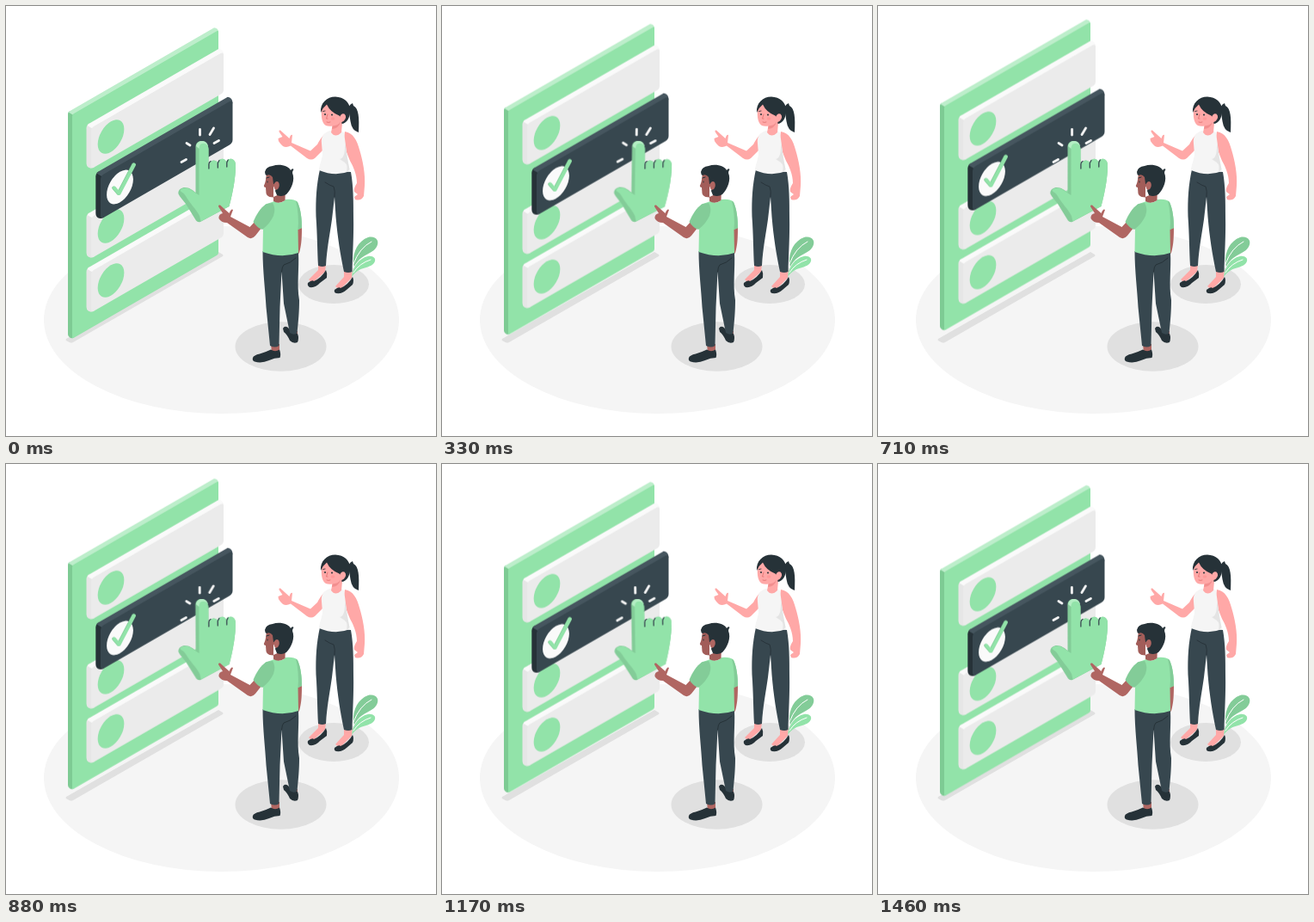
Animation, 500 px wide and 500 px high, one loop 1500 ms. Source, as an HTML page:

```html
<!DOCTYPE html>
<html lang="en">
<head>
<meta charset="utf-8">
<title>Choosing an option</title>
<style>
  html, body { margin: 0; width: 100%; height: 100%; overflow: hidden; background: #fff; }
  svg { display: block; width: 100vw; height: 100vh; }
  #hand { transform-origin: 234px 197px; }
  .line { fill: none; stroke-linecap: round; stroke-linejoin: round; }
  .green { fill: #92e3a9; }
  .shade { fill: #83cc98; }
  .dark { fill: #263238; }
  .slate { fill: #37474f; }
  .brown { fill: #b06662; }
  .pink { fill: #ffa8a7; }
</style>
</head>
<body>
<svg viewBox="0 0 500 500">
  <ellipse cx="250.5" cy="365" rx="206.5" ry="109" fill="#f5f5f5"/>
  <g fill="#e0e0e0">
    <ellipse cx="319.5" cy="396" rx="53" ry="28.7"/>
    <ellipse cx="381" cy="323.5" rx="41" ry="22.5"/>
    <path d="M70 387Q69 388 70 389L74 391.2Q76 392 78 391L252 291Q253 290 252 289L247 286Z"/>
  </g>

  <g id="board"></g>

  <g id="hand">
    <path class="line" stroke="#f5f5f5" stroke-width="2.8"
      d="M225.5 143.5V150M237 149.500L241.500 142M210 159.500L214 162M242 159.500L247.500 156.500M204 181.500L209.500 178.500"/>
    <path class="shade" d="M220.500 165C220 159 224 156.500 228 157C232 157 235 160 235.500 166V187C236 180 242 177 246 182
      C248 177 254 176 256 181C258 176 267 176 267 185C267 200 264 216 259.500 233L226 251Q223 252 221 249.500
      L209 230C206 226 202 222 200.500 218.500C199.500 214 204 211 208 211C213 211 217 214 220.500 217Z"/>
    <path class="green" d="M224.500 167C224 161 227 159 229.500 159C233 159 235.500 162 235.500 167V188C236 180 242 177 246 182
      C248 177 254 176 256 181C258 176 267 176 267 185C267 200 264 216 259.500 233L226.500 250.500L225 244
      C221 236 214 230 209 221C207 217 202.500 216 202.500 214.500C204 211 210 211 214 213Q218 216 224.500 220Z"/>
    <path fill="#b4eec4" d="M221 163C222 158 226 156.500 230 157.300Q234 158.500 235 163Q231 157.500 226 161Q224.500 163 224.500 166Z"/>
    <path class="line" stroke="#37474f" stroke-width="1.3" d="M235.900 189V184Q236 181.500 238 180.500M246.300 188V182.500L248 179.500M256.800 187V182L258.200 179"/>
  </g>

  <g id="plant">
    <path class="shade" d="M404 299C403 285 410 273 421 269C430 267 435 273 431 280C426 289 413 288 405 303Z"/>
    <path class="green" d="M402 315C403 303 411 293 421 291C428 290 432 295 427 300C420 306 410 303 402 315Z"/>
    <path class="line" stroke="#fff" stroke-width="1" d="M404 300Q411 281 425 274M404 310Q411 299 424 295"/>
  </g>

  <g id="woman">
    <path class="dark" d="M398 118Q400 114 403 113L404 116C410 119 411 129 410 147Q402 145 400.500 134Z"/>
    <path class="pink" d="M378 146C370 146 366 154 362 161L354 168.500L332 159L333 150Q331 149 329.500 154
      L319 144.500Q316.500 144 318 147L321.500 152L316.500 154Q316 157 319 160L322 163Q326 165 331 162.500
      L350 177Q355 180 359 177L372 164Z"/>
    <path class="pink" d="M394 146C404 148 408 156 411 167C415 180 418 196 417 209L416 221Q413 227 406 225
      L405 222L409 219L405 216Q404 212 408 206C408 196 404 187 400 180L392 160Z"/>
    <path class="pink" d="M363 300H372L371 309L356 322L352 318L363 307ZM393 307H402.500L402 316L388 330L383 326L393 315Z"/>
    <path class="dark" d="M351 322Q356 318 358 320Q367 316 372 307Q374 311 373 316L365 322Q360 328 353 327Q350 325 351 322Z
      M382 330Q387 326 389 328Q398 324 403 315Q405 319 403 324L396 330Q391 335 384 334Q381 333 382 330Z"/>
    <path class="slate" d="M365 190C361 208 360 225 360.500 245C362 265 362 285 363 302Q368 304 372 302
      C373 282 377 263 379 248L382 222L383.500 245C385.500 269 389 290 393 309Q398 311 402.500 309
      C403 290 404.500 266 404 246C404 226 404 210 401 193Z"/>
    <path class="line" stroke="#263238" stroke-width=".9" d="M382 222Q383 215 381 210Q377 209 371 205"/>
    <path fill="#f5f5f5" d="M376 145C370 148 366 151 367 160L368 172C367 181 364 186 364 191Q383 199 400 192
      L397 177L393 147L389 145Q382 152 378 145Z"/>
    <path fill="#e4e4e4" d="M394 158L397 177L399.500 190L396 193Q398 185 394 182L388 178Q395 177 394 158Z"/>
    <path class="pink" d="M369 113C366 120 366 131 369 136Q372 141 379.500 139.500L378 147Q383 154 390 147L391 136L396 129L392 113L380 108Z"/>
    <path fill="#f28f8f" d="M379.500 139.500Q386 139 389 135Q387 142 379.200 143Z"/>
    <path class="dark" d="M366 124C365 113 373 105.500 383 105.500C393 106 400 112 400 121C400 130 397 136 390.500 137
      Q390 130 387.500 127.500Q377 123.500 373 114.500Q368.500 118 366 124Z"/>
    <path class="pink" d="M388 129Q390 124 393.500 125.500Q397 129 393 133.500Q390 136 388.500 134Z"/>
    <circle class="dark" cx="371" cy="126" r="1"/>
    <circle class="dark" cx="379" cy="126.500" r="1"/>
    <path class="line" stroke="#263238" stroke-width=".8" d="M368.500 122.500L371 122"/>
    <path class="line" stroke="#e0706f" stroke-width=".8" d="M374 126L372.500 131H374M373 135Q375 136 377 135"/>
    <ellipse cx="380" cy="131" rx="2.300" ry="1.800" fill="#ff9a9a"/>
  </g>

  <g id="man">
    <path class="brown" d="M338 255H344C344 266 344 277 341 287L337 291ZM308 393H318V402L309 403ZM331 378H339V385H332Z"/>
    <path class="dark" d="M287 409Q288 406 295 404.500Q303 402 308 399.500Q313 403 318 399.500Q320 405 318.500 409
      Q312 409 306 412Q297 416 289 413.500Q286 412 287 409Z
      M322 375Q324 371 328 374Q333 381 339 381Q341 386 339 391Q334 393 330 389Q327 382 323 379Z"/>
    <path class="slate" d="M298.500 285C298.500 308 301.500 330 302.500 350L307 395Q313 398 317.500 395L318.500 350L320.500 309
      L323 346L330 380Q335 383 338.500 380.500C340 366 341 355 341 342C338 324 341 306 340 287Z"/>
    <path class="line" stroke="#263238" stroke-width="1" d="M320.500 309Q321 303 323 301Q331 299 337 293"/>
    <path class="brown" d="M290 250L283.500 257L261 245L264 237Q262 235 259.500 241L249 231.500Q246 231 247.500 234
      L252 241Q247 242 247.500 247Q250 252 257 252L281 269Q286 272 290 267L301 253Z"/>
    <path class="green" d="M301 231L312 227Q320 231 325 225Q335 224 339 228C343 237 344 248 344 258L339.500 260L340 287
      Q321 294 298.500 286L299 258Z"/>
    <path class="shade" d="M303 230C295 235 291 243 287.500 251Q292 258 298 260Q307 253 311 244Q314 235 310 229Z"/>
    <path class="shade" d="M337 226.500L339 228C343 237 344 248 344 258L339.500 260Q341 243 337 226.500Z"/>
    <path fill="#a25d59" d="M311 210H325L324.500 226Q317 231 311 227ZM303 194C302 202 302 205 299.800 209
      Q299.800 211 302 211L302.500 218Q304 223 311 222L320 218L318 194Z"/>
    <path class="dark" d="M301 193Q302 187 310 186C318 183 329 186 331 191Q333 188 334.500 190Q333 192 333 194
      C336.500 202 332 213 326 219Q321 222.500 315 220L313 215Q315 211 311 207L310 199Q307 195 303 197Q301 196 301 193Z"/>
    <path class="brown" d="M311 208Q314 202 317 205Q319 209 316 213Q313 215 312 212Z"/>
    <path class="line" stroke="#263238" stroke-width="1" d="M303 200L306 199M304 204V205"/>
  </g>
</svg>

<script>
  const TILT = -0.577;
  const GREY = ['#ebebeb', '#fafafa', '#e6e6e6'];
  const MINT = ['#92e3a9', '#bdeecb', '#7ecb94'];
  const NIGHT = ['#37474f', '#46565f', '#263238'];

  const skewed = (x, y, body) =>
    `<g transform="matrix(1 ${TILT} 0 1 ${x} ${y})">${body}</g>`;

  // Isometric box: x, y is the top left corner of the front face, d its depth.
  function slab(x, y, w, h, d, r, [front, top, side]) {
    const e = d * 1.154;
    return skewed(x, y, `
      <path fill="${side}" d="M${-d} ${r - e}Q${-d} ${-e} ${r - d} ${-e}L${r} 0V${h}Q0 ${h} ${-d * .55} ${h - e * .55}Q${-d} ${h - e} ${-d} ${h - r - e}Z"/>
      <path fill="${top}" d="M${-d + r * .3} ${r * .3 - e}Q${r * .6 - d} ${-e} ${r - d} ${-e}H${w - d}Q${w} ${-e * .4} ${w} ${r}H${r}L${r * .3} ${r * .3}Z"/>
      <rect width="${w}" height="${h}" rx="${r}" fill="${front}"/>`);
  }

  const disc = (x, y, r, fill) =>
    `<circle r="${r}" fill="${fill}" transform="matrix(.866 -.5 0 1 ${x} ${y})"/>`;

  const row = y => slab(99, y, 154, 47.8, 5.5, 3.5, GREY) + disc(122, y + 10.2, 17.7, MINT[0]);

  const tick = (dx, color) =>
    `<path class="line" stroke="${color}" stroke-width="4" d="M${126 + dx} 211.5L${131.5 + dx} 218L${149 + dx} 184.500"/>`;

  const board = document.getElementById('board');
  board.innerHTML =
    slab(77, 126.2, 170, 260.8, 5, 2, MINT) +
    [141.8, 245.8, 308.8].map(row).join('') +
    slab(110, 197.5, 153.5, 50.5, 5.7, 4, NIGHT) +
    disc(132.5, 210.5, 17.8, '#fafafa') +
    tick(-.8, MINT[2]) + tick(0, MINT[0]);

  const loop = { duration: 1500, iterations: Infinity, easing: 'linear' };

  const moves = [
    board.animate([
      { transform: 'translateY(0px)' },
      { transform: 'translateY(-10px)' },
      { transform: 'translateY(0px)' }
    ], loop),
    document.getElementById('hand').animate([
      { offset: 0, transform: 'rotate(0deg)' },
      { offset: .25, transform: 'rotate(1deg)' },
      { offset: .75, transform: 'rotate(-1deg)' },
      { offset: 1, transform: 'rotate(0deg)' }
    ], loop)
  ];
  moves.forEach(m => { m.startTime = document.timeline.currentTime; });
</script>
</body>
</html>
```
